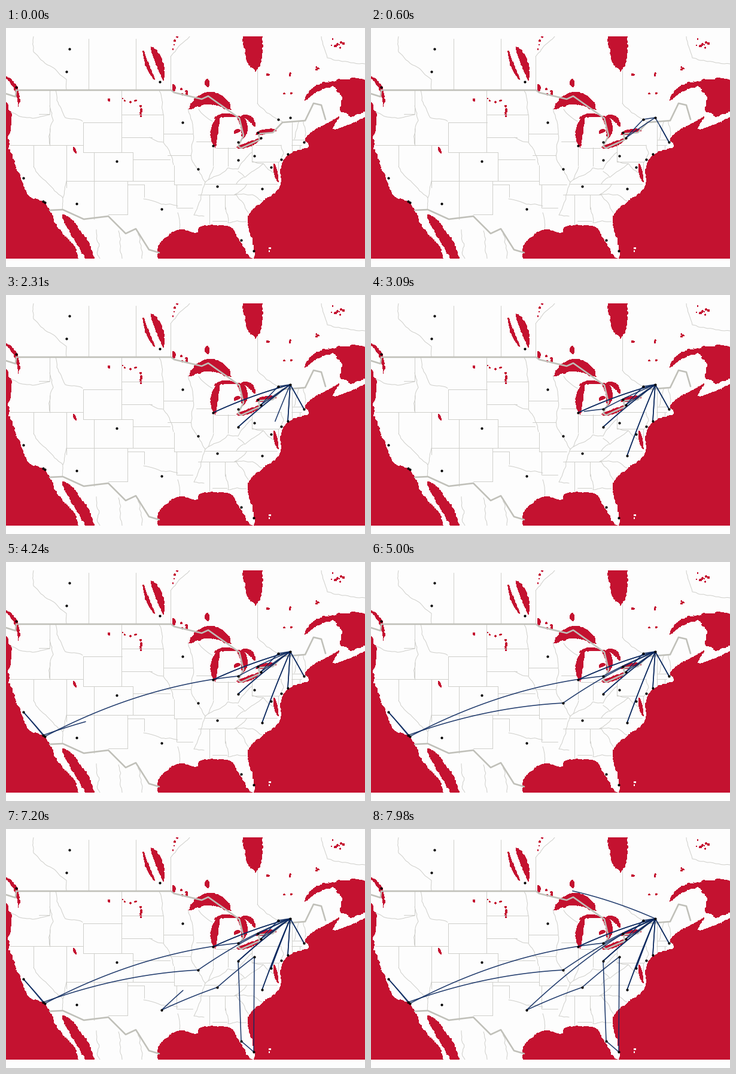
Animation of 600 by 400 pixels, one loop 8000 ms. Source, as a matplotlib script:

```python
import math
import random

import matplotlib.pyplot as plt
from matplotlib.animation import FuncAnimation
from matplotlib.collections import LineCollection, PolyCollection
from matplotlib.patches import Rectangle

W, H, DPI = 600, 400, 100
PX = 72 / DPI
LOOP, STEP = 8000, 25
PAPER, WATER = "#fdfdfd", "#c41230"
STATE, BORDER, ROUTE = "#cfcfcb", "#c0c0b9", "#0d2a60"
rng = random.Random(11)

# Mercator page: pixels per radian, y of the equator, x of longitude 0
SCALE, EQUATOR, GREENWICH = 529.8, 624.6, 1155.3

# ---------------------------------------------------------------- geography
WEST_COAST = [(-6, 112), (9, 148), (5, 197), (24, 250), (38, 281), (64, 293),
              (88, 336), (115, 366), (121, 390)]
EAST_COAST = [(254, 390), (256, 363), (286, 338), (318, 343), (324, 333),
              (352, 330), (376, 334), (388, 352), (409, 385), (416, 374),
              (404, 325), (414, 302), (456, 270), (459, 236), (472, 212),
              (506, 199), (500, 186), (516, 171), (545, 155), (557, 149),
              (546, 170), (575, 161), (606, 147)]
GULF_MOUTH = [(538, 89), (560, 86), (606, 85), (606, 138), (580, 148),
              (558, 137), (560, 112), (550, 99)]

# water along a bent spine: start, bend, end, half width
LAKES = [
    ((305, 136), (343, 98), (378, 139), 10),
    ((350, 201), (343, 170), (357, 148), 6),
    ((348, 151), (366, 142), (386, 149), 3),
    ((385, 147), (405, 158), (395, 186), 6),
    ((393, 148), (410, 146), (416, 165), 4),
    ((392, 172), (386, 170), (381, 177), 3),
    ((385, 200), (402, 199), (427, 184), 4),
    ((417, 179), (430, 172), (452, 171), 4),
    ((411, -40), (412, 30), (417, 73), 16),
    ((242, 31), (257, 50), (264, 88), 6),
    ((229, 36), (234, 64), (249, 87), 3),
    ((94, 312), (122, 345), (152, 405), 9),
    ((499, 122), (516, 92), (565, 92), 5),
    ((-4, 80), (22, 92), (21, 132), 3),
    ((448, 227), (450, 241), (455, 258), 3),
    ((113, 199), (114, 205), (118, 210), 2),
    ((337, 85), (335, 92), (338, 99), 4),
    ((278, 94), (283, 99), (279, 107), 3),
]
# scattered ponds: centre, spread, count
PONDS = [(555, 27, 12, 5, 9), (283, 22, 3, 8, 4), (207, 121, 9, 3, 5),
         (170, 121, 3, 1, 2), (226, 146, 1, 12, 7), (300, 107, 7, 4, 5),
         (476, 77, 4, 3, 5), (520, 69, 3, 3, 4), (438, 79, 2, 2, 2),
         (472, 109, 8, 1, 3)]

FRONTIER = [
    [(0, 110), (16, 115), (17, 104), (276, 104), (281, 108), (327, 119),
     (338, 114), (390, 151), (397, 180), (388, 198), (393, 201), (424, 187),
     (422, 177), (446, 175), (462, 158), (500, 155), (514, 126), (527, 129),
     (534, 153)],
    [(73, 305), (95, 304), (130, 320), (171, 315), (200, 344), (217, 336),
     (239, 371), (256, 376)]]

# straight state lines: latitude or longitude, then from and to
PARALLELS = [
    (46, -119, -117), (45, -111, -104), (45.94, -104, -96.5),
    (43, -104, -98.5), (42, -124.2, -111), (41, -111, -102),
    (40, -102, -95.3), (37, -114, -94.6), (36.5, -103, -100),
    (36.5, -94.6, -89.6), (36.55, -89, -76), (35, -90.2, -83.4),
    (43.5, -96.5, -91.2), (40.6, -95.7, -91.5), (42.5, -90.6, -87.8),
    (39.72, -80.5, -75.6), (42, -79.8, -75.3), (42.72, -73.3, -71),
    (42.03, -73.4, -71.5), (41.6, -87, -83.5), (33, -94, -91.2),
    (32, -106.4, -103), (31, -87.6, -85)]
MERIDIANS = [
    (-120, 39, 42), (-117, 42, 44.2), (-117, 46, 49), (-114.05, 36, 42),
    (-111, 41, 45), (-109.05, 31.3, 41), (-104.05, 41, 49),
    (-102.05, 37, 41), (-103, 32, 37), (-100, 34.6, 36.5),
    (-94.6, 36.5, 39.2), (-94.1, 33, 36.5), (-96.5, 42.5, 45.9),
    (-87.5, 39.2, 41.7), (-84.8, 39.1, 41.7), (-80.5, 39.7, 42.1),
    (-88.2, 30.4, 35), (-85.4, 32.8, 35), (-73.3, 41, 45),
    (-75.7, 38.5, 39.7), (-71.8, 41.4, 42), (-110, 49, 54.7),
    (-101.5, 49, 54.7), (-95.2, 49, 52.8), (-79.5, 47.4, 51.4)]
# winding lines through a few points
RIVERS = [
    [(8, 141), (35, 150), (73, 145)],
    [(73, 130), (79, 155), (74, 166), (74, 197)],
    [(83, 104), (85, 121), (99, 150), (128, 156)],
    [(46, 232), (95, 284), (94, 304)],
    [(101, 256), (95, 284)],
    [(240, 183), (263, 191), (280, 229)],
    [(256, 104), (263, 145)],
    [(230, 286), (260, 295), (287, 298)],
    [(287, 309), (290, 336)],
    [(304, 135), (313, 178), (310, 219), (333, 258), (314, 313), (331, 315)],
    [(46, 14), (46, 40), (101, 86), (101, 103)],
    [(275, 48), (307, 14)],
    [(420, 126), (436, 142), (462, 157)],
    [(527, 14), (537, 50), (562, 56), (600, 60)]]
VALLEYS = [
    [(333, 258), (371, 234), (388, 236), (411, 208)],
    [(347, 232), (338, 254)],
    [(322, 136), (345, 156)],
    [(382, 279), (402, 262)],
    [(382, 279), (412, 279), (428, 290)],
    [(385, 279), (405, 309)],
    [(367, 300), (371, 326), (402, 324)],
    [(388, 240), (399, 250), (430, 227), (411, 223)],
    [(430, 227), (448, 243)],
    [(397, 250), (385, 261)],
    [(460, 196), (464, 210), (457, 224)],
    [(490, 156), (482, 186)],
    [(497, 156), (500, 182)]]

# ---------------------------------------------------------------- trips
CITY = dict(
    edmonton=(106, 35), calgary=(101, 73), winnipeg=(257, 90),
    vancouver=(17, 99), stpaul=(295, 158), chicago=(346, 197),
    detroit=(388, 191), toronto=(421, 175), buffalo=(426, 184),
    ottawa=(455, 153), home=(475, 150), boston=(498, 191),
    newyork=(471, 211), philly=(460, 220), capital=(443, 233),
    pittsburgh=(415, 214), columbus=(388, 221), stlouis=(321, 236),
    nashville=(353, 265), raleigh=(428, 269), tampa=(393, 355),
    sunrise=(414, 373), dallas=(260, 303), denver=(185, 223),
    phoenix=(118, 294), losangeles=(62, 290), anaheim=(65, 292),
    sanjose=(29, 251))
TRIP = """home buffalo ottawa home boston home newyork home columbus home
chicago home raleigh home detroit anaheim sanjose losangeles stlouis home
capital home columbus tampa sunrise pittsburgh nashville dallas toronto home
winnipeg""".split()
MS_PER_DEG, STOP = 23.15, 60


def page(lon, lat):
    return (GREENWICH + SCALE * math.radians(lon),
            EQUATOR - SCALE * math.asinh(math.tan(math.radians(lat))))


def wind(pts, amp=0.2, least=2.2):
    """Polyline broken into small seeded bends."""
    out = []

    def split(a, b):
        dx, dy = b[0] - a[0], b[1] - a[1]
        size = math.hypot(dx, dy)
        if size < least:
            out.append(a)
            return
        k = rng.uniform(-1, 1) * min(amp, 2.5 / size)
        mid = ((a[0] + b[0]) / 2 - dy * k, (a[1] + b[1]) / 2 + dx * k)
        split(a, mid)
        split(mid, b)

    for a, b in zip(pts, pts[1:]):
        split(a, b)
    return out + [pts[-1]]


def shore(pts):
    """Jagged edge on whole pixels."""
    return [(round(x), round(y)) for x, y in wind(pts)]


def curve(pts, n=5):
    """Catmull-Rom spline through the points."""
    ext = [pts[0]] + pts + [pts[-1]]
    out = []
    for a, b, c, d in zip(ext, ext[1:], ext[2:], ext[3:]):
        for t in (i / n for i in range(n)):
            out.append(tuple(
                q + t * (r - p) / 2 + t * t * (p - 2.5 * q + 2 * r - s / 2)
                + t ** 3 * (1.5 * (q - r) + (s - p) / 2)
                for p, q, r, s in zip(a, b, c, d)))
    return out + [pts[-1]]


def lake(a, b, c, width, n=12):
    """Outline of water tapering along a quadratic spine."""
    left, right = [], []
    for u in (i / n for i in range(n + 1)):
        v = 1 - u
        x, y = (v * v * p + 2 * u * v * q + u * u * r
                for p, q, r in zip(a, b, c))
        dx, dy = (v * (q - p) + u * (r - q) for p, q, r in zip(a, b, c))
        k = width * max(0, math.sin(math.pi * u)) ** 0.6 / math.hypot(dx, dy)
        left.append((x - dy * k, y + dx * k))
        right.append((x + dy * k, y - dx * k))
    return shore(left + right[::-1])


def ponds(cx, cy, sx, sy, count):
    for _ in range(count):
        x, y = rng.gauss(cx, sx * 0.7), rng.gauss(cy, sy * 0.7)
        r = rng.uniform(1, 2.2)
        yield lake((x - r, y), (x, y + rng.uniform(-2, 2)), (x + r, y), r, 6)


def to_sphere(p):
    lon = p[0] / SCALE
    lat = math.atan(math.sinh((EQUATOR - p[1]) / SCALE))
    return (math.cos(lat) * math.cos(lon), math.cos(lat) * math.sin(lon),
            math.sin(lat))


def to_page(v):
    return (SCALE * math.atan2(v[1], v[0]),
            EQUATOR - SCALE * math.atanh(v[2]))


class Leg:
    """Great circle between two cities, flown at constant speed."""

    def __init__(self, a, b, start):
        self.a, self.b = to_sphere(CITY[a]), to_sphere(CITY[b])
        self.arc = math.acos(sum(p * q for p, q in zip(self.a, self.b)))
        self.start = start
        self.time = math.degrees(self.arc) * MS_PER_DEG
        self.full = self.path(1)

    def at(self, u):
        s = math.sin(self.arc)
        p, q = math.sin((1 - u) * self.arc) / s, math.sin(u * self.arc) / s
        return to_page([p * x + q * y for x, y in zip(self.a, self.b)])

    def path(self, u):
        n = max(2, math.ceil(u * math.degrees(self.arc)))
        return [self.at(u * i / n) for i in range(n + 1)]

    def drawn(self, t):
        u = (t - self.start) / self.time
        return self.full if u >= 1 else self.path(u)


def plan():
    legs, t = [], 0
    for a, b in zip(TRIP, TRIP[1:]):
        legs.append(Leg(a, b, t))
        t += legs[-1].time + STOP
    return legs


fig = plt.figure(figsize=(W / DPI, H / DPI), dpi=DPI, facecolor=PAPER)
ax = fig.add_axes([0, 0, 1, 1])
ax.set_xlim(0, W)
ax.set_ylim(H, 0)
ax.axis("off")
frame = Rectangle((0, 14), W, 372, transform=ax.transData)


def fill(shapes, color, z):
    art = PolyCollection(shapes, facecolors=color, edgecolors="none",
                         antialiaseds=False, zorder=z)
    ax.add_collection(art)
    art.set_clip_path(frame)


def strokes(lines, color, width, z, **kw):
    art = LineCollection(lines, colors=color, linewidths=width * PX,
                         capstyle="round", joinstyle="round", zorder=z, **kw)
    ax.add_collection(art)
    art.set_clip_path(frame)
    return art


seas = [shore(curve(WEST_COAST)) + [(-6, H)],
        shore(curve(EAST_COAST)) + [(W + 6, H), (254, H)],
        shore(GULF_MOUTH + GULF_MOUTH[:1])]
seas += [lake(*spec) for spec in LAKES]
seas += [p for spec in PONDS for p in ponds(*spec)]
fill(seas, WATER, 1)
fill(list(ponds(440, 371, 2, 2, 3)), PAPER, 2)

lines = [[page(a, lat), page(b, lat)] for lat, a, b in PARALLELS]
lines += [[page(lon, a), page(lon, b)] for lon, a, b in MERIDIANS]
lines += [wind(r, 0.08, 5) for r in RIVERS + VALLEYS]
lines += [wind([(x, 330 + x / 20), (x + 2, 358), (x + 6, 386)], 0.2, 6)
          for x in (151, 188, 221)]
strokes(lines, STATE, 1, 3)
strokes(FRONTIER, BORDER, 2.6, 4)
routes = strokes([], ROUTE, 1.6, 5, alpha=0.9)
xs, ys = zip(*CITY.values())
ax.scatter(xs, ys, s=(4.2 * PX) ** 2, c="black", linewidths=0, zorder=6)

legs = plan()


def draw(i):
    t = i * STEP
    routes.set_segments([leg.drawn(t) for leg in legs if leg.start < t])
    return [routes]


anim = FuncAnimation(fig, draw, frames=LOOP // STEP, interval=STEP,
                     init_func=lambda: draw(0), repeat=True, repeat_delay=0)
plt.show()
```
